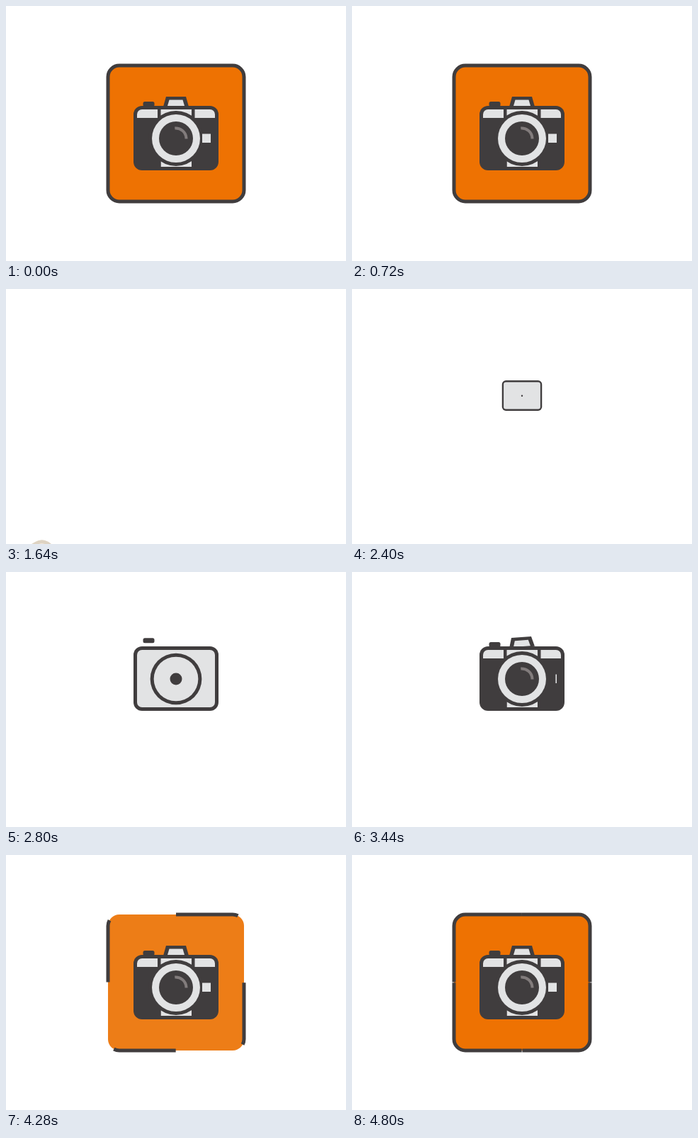
Recreate the animation shown at these times as an HTML page with a canvas. Size 480 by 360 pixels, loop 4840 ms.

```html
<!DOCTYPE html>
<html lang="en">
<head>
<meta charset="utf-8">
<title>Camera sticker</title>
<style>
html, body { margin: 0; width: 100%; height: 100%; overflow: hidden; background: #fff; }
canvas { display: block; width: 480px; height: 360px; }
</style>
</head>
<body>
<canvas id="stage"></canvas>
<script>
const LOOP = 4840;
const DARK = '#403d3e', LIGHT = '#e2e3e4', ORANGE = [238, 114, 2], GREY = [226, 234, 234];
const CREAM = '#fcefe2', BEIGE = '#ded3c2';
const SIDE = 192, RAD = 16, QUARTER = SIDE - 2 * RAD + Math.PI * RAD / 2;
const TILT = 29.7 * Math.PI / 180;
const CORNER = { x: 338.5, y: 81.5 };

const canvas = document.getElementById('stage');
const ratio = window.devicePixelRatio || 1;
canvas.width = 480 * ratio;
canvas.height = 360 * ratio;
const c = canvas.getContext('2d');

const clamp = u => Math.max(0, Math.min(1, u));
const part = (t, a, b) => clamp((t - a) / (b - a));
const ease = (t, a, b) => { const u = part(t, a, b); return u * u * (3 - 2 * u); };
const mix = (a, b, u) => a + (b - a) * u;

function scoped(draw) {
  c.save();
  draw();
  c.restore();
}

function box(x, y, w, h, r, fill) {
  c.beginPath();
  c.roundRect(x, y, w, h, r);
  c.fillStyle = fill;
  c.fill();
}

function disc(r, fill) {
  if (r <= 0) return;
  c.beginPath();
  c.arc(240, 151, r, 0, 7);
  c.fillStyle = fill;
  c.fill();
}

function poly(points, fill) {
  c.beginPath();
  points.forEach(p => c.lineTo(p[0], p[1]));
  c.closePath();
  c.fillStyle = fill;
  c.fill();
}

// Card outline, clockwise from the middle of the top side
function cardPath() {
  c.beginPath();
  c.moveTo(240, 84);
  c.arcTo(336, 84, 336, 276, RAD);
  c.arcTo(336, 276, 144, 276, RAD);
  c.arcTo(144, 276, 144, 84, RAD);
  c.arcTo(144, 84, 336, 84, RAD);
  c.closePath();
}

function card(fill, line, drawn, alpha) {
  scoped(() => {
    cardPath();
    c.globalAlpha = alpha;
    c.fillStyle = fill;
    c.fill();
    c.globalAlpha = 1;
    if (drawn <= 0) return;
    if (drawn < 1) c.setLineDash([QUARTER * drawn, QUARTER * (1 - drawn)]);
    c.lineWidth = 5;
    c.strokeStyle = line;
    c.stroke();
  });
}

function hump(t) {
  const u = part(t, 2880, 3120);
  if (u <= 0) return;
  scoped(() => {
    c.translate(240, 106);
    c.rotate(-12 * Math.PI / 180 * (1 - ease(t, 3200, 3600)) * part(t, 3100, 3200));
    c.scale(1, ease(t, 2880, 3120) + 0.3 * Math.sin(Math.PI * u));
    poly([[-18, 0], [-14, -14], [14, -14], [18, 0]], DARK);
    poly([[-12, -1], [-9.5, -9.5], [9.5, -9.5], [12, -1]], LIGHT);
  });
}

function body(t) {
  const grow = ease(t, 2850, 3160);
  box(180, 105, 120, 91, 12, DARK);
  box(185, 110, 110, 81, 7, LIGHT);
  if (grow <= 0) return;
  scoped(() => {
    c.beginPath();
    c.roundRect(184, 109, 112, 83, 7);
    c.clip();
    c.fillStyle = DARK;
    const wide = 70 * grow, tall = 83 * grow;
    c.fillRect(184, 192 - wide, 34.5, wide);
    c.fillRect(262, 192 - wide, 34, wide);
    c.fillRect(214, 192 - tall, 4.5, tall);
    c.fillRect(262, 192 - tall, 4.5, tall);
  });
}

function lens(t) {
  const r = 36.5 * ease(t, 2400, 2880);
  disc(r > 0 ? r + 2.5 : 0, DARK);
  disc(r - 2.5, LIGHT);
  disc(24 * ease(t, 2600, 3100), DARK);
  scoped(() => {
    c.globalAlpha = part(t, 3000, 3200);
    c.beginPath();
    c.arc(239.5, 151.5, 15, -1.65, 0);
    c.lineWidth = 4;
    c.strokeStyle = '#827c7c';
    c.stroke();
  });
}

function camera(t) {
  const size = ease(t, 2050, 2780);
  if (size <= 0) return;
  scoped(() => {
    c.translate(240, 150.5 + 36 * ease(t, 3760, 4140));
    c.rotate(5.5 * Math.PI / 180 * Math.sin(2 * Math.PI * part(t, 3200, 3420)));
    c.scale(size, size);
    c.translate(-240, -150.5);
    const pop = ease(t, 2640, 2790);
    if (pop > 0) {
      const y = mix(93, 99, ease(t, 2780, 2960));
      box(201.5 - 8 * pop, y, 16 * pop, 7, 2.5, DARK);
    }
    hump(t);
    body(t);
    lens(t);
    const slot = 12 * ease(t, 3360, 3720);
    c.fillStyle = LIGHT;
    if (slot > 0) c.fillRect(289 - slot, 144.5, slot, 12.5);
  });
}

function front() {
  card(`rgb(${ORANGE})`, DARK, 1, 1);
  camera(LOOP);
}

const back = () => card(CREAM, BEIGE, 1, 1);

// Paints the band a..b of the sheet, measured along the peel, placed at xa..xb
function band(axis, angle, a, b, xa, xb, paint) {
  scoped(() => {
    c.translate(axis.x, axis.y);
    c.rotate(angle);
    c.translate(xa, 0);
    c.scale((xb - xa) / (b - a), 1);
    c.translate(-a, 0);
    c.beginPath();
    c.rect(a - 0.4, -900, b - a + 0.8, 1800);
    c.clip();
    c.rotate(-angle);
    c.translate(-axis.x, -axis.y);
    paint();
  });
}

// Sheet rolled around a cylinder of radius r that sweeps from the top right corner
function peel(t) {
  const dist = 642 * ease(t, 760, 1760);
  if (dist < 0.5) return front();
  const r = 26 * Math.min(1, dist / 90);
  const reach = (dist + Math.PI * r) / 2;
  const n = { x: Math.sin(TILT), y: -Math.cos(TILT) };
  const axis = { x: CORNER.x - n.x * reach, y: CORNER.y - n.y * reach };
  const angle = Math.atan2(n.y, n.x);
  const out = ease(t, 1480, 1640), settle = ease(t, 1640, 1760);
  const roll = m => r * Math.sin(m / r);
  const steps = 24, step = Math.PI * r / steps;
  scoped(() => {
    c.translate(-45 * out + 32 * settle, -33 * settle);
    band(axis, angle, -900, 0, -900, 0, front);
    for (let i = 0; i < steps; i++) {
      const a = i * step, b = a + step;
      band(axis, angle, a, b, roll(a), roll(b), i < steps / 2 ? front : back);
    }
    const end = Math.PI * r;
    band(axis, angle, end, end + 900, 0, -900, back);
  });
}

function render(t) {
  c.setTransform(ratio, 0, 0, ratio, 0, 0);
  c.fillStyle = '#fff';
  c.fillRect(0, 0, 480, 360);
  if (t < 1880) return peel(t);
  if (t > 3740) {
    const tint = ease(t, 3760, 4400);
    const fill = ORANGE.map((v, i) => Math.round(mix(GREY[i], v, tint)));
    card(`rgb(${fill})`, DARK, ease(t, 3760, LOOP), part(t, 3740, 3960));
  }
  camera(t);
}

const start = performance.now();
function tick(now) {
  render(Math.max(0, now - start) % LOOP);
  requestAnimationFrame(tick);
}
render(0);
requestAnimationFrame(tick);
</script>
</body>
</html>
```
